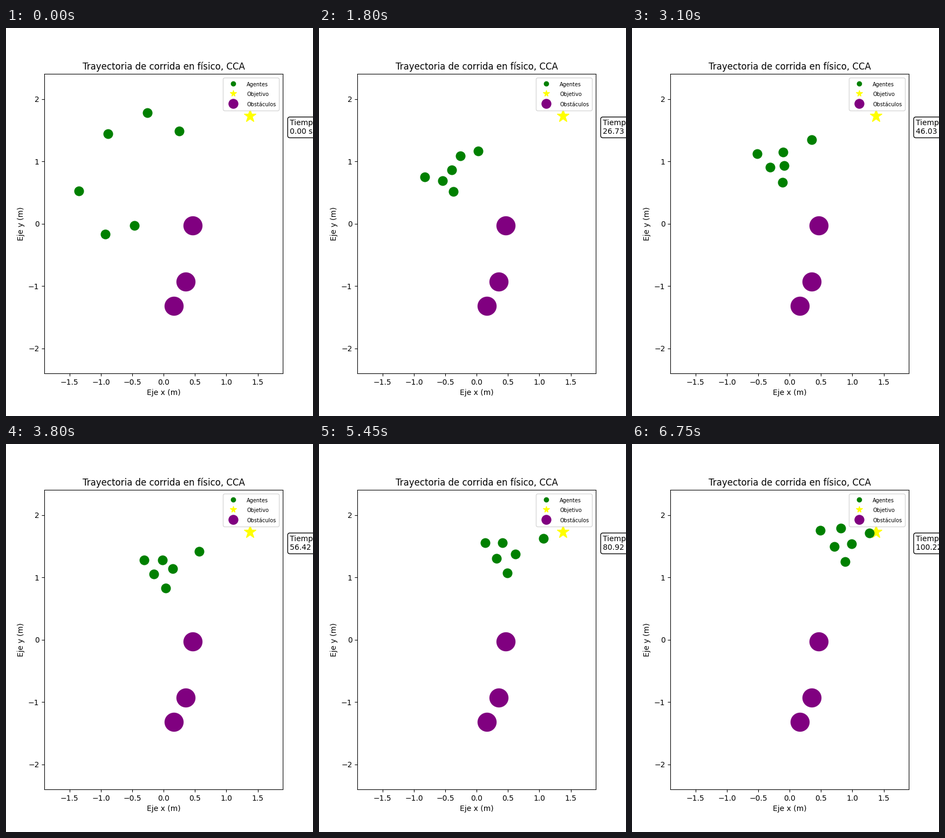
A matplotlib script that plays this animation: 569 by 719 pixels, repeating every 6800 ms.

```python
import numpy as np
import matplotlib.pyplot as plt
from matplotlib.animation import FuncAnimation

FRAMES, STEP = 136, 50
SECONDS_PER_FRAME = 0.7424
WIDTH, HEIGHT = 569, 719

# Gather, regroup, turn, then drift to the goal; the leader comes last
KEYS = np.array([0, 22, 49, 76, 135])
ROUTES = [
    [(135, 302), (180, 295), (211, 252), (256, 215), (349, 160)],
    [(189, 196), (231, 244), (260, 271), (309, 231), (407, 185)],
    [(262, 157), (255, 235), (273, 237), (290, 215), (387, 156)],
    [(238, 366), (239, 307), (265, 300), (296, 267), (395, 218)],
    [(184, 382), (215, 294), (241, 274), (274, 241), (375, 190)],
    [(321, 191), (285, 238), (312, 215), (358, 199), (440, 165)],
]
OBSTACLES = [(346, 366), (333, 470), (311, 515)]
GOAL = [(452, 163)]


def metres(points):
    """Canvas pixels to axis units."""
    return (np.array(points) - (292.1, 362.6)) / (116.25, -115.5)


points = metres(ROUTES)
gaps = np.diff(KEYS)
speed = np.diff(points, axis=1) / gaps[:, None]

# Harmonic mean slopes keep every leg free of overshoot
before, after = speed[:, :-1], speed[:, 1:]
product = before * after
slopes = np.zeros_like(points)
slopes[:, 0], slopes[:, -1] = speed[:, 0], speed[:, -1]
np.divide(2 * product, before + after, out=slopes[:, 1:-1], where=product > 0)
slopes[-1, -1] = 0  # the leader brakes at the goal


def positions(frame):
    k = min(np.searchsorted(KEYS, frame, side="right"), len(gaps)) - 1
    s = (frame - KEYS[k]) / gaps[k]
    ease = s * s * (3 - 2 * s)
    bend = slopes[:, k] * (1 - s) - slopes[:, k + 1] * s
    return (points[:, k] * (1 - ease) + points[:, k + 1] * ease
            + gaps[k] * s * (1 - s) * bend)


fig = plt.figure(figsize=(WIDTH / 100, HEIGHT / 100), dpi=100)
ax = fig.add_axes([71.25 / WIDTH, 79.2 / HEIGHT, 441.75 / WIDTH, 554.4 / HEIGHT])
ax.set(xlim=(-1.9, 1.9), ylim=(-2.4, 2.4), xlabel="Eje x (m)",
       ylabel="Eje y (m)", title="Trayectoria de corrida en físico, CCA")

agents, = ax.plot([], [], "o", color="green", ms=12, label="Agentes", zorder=3)
ax.plot(*metres(GOAL).T, "*", color="yellow", ms=17, label="Objetivo")
ax.plot(*metres(OBSTACLES).T, "o", color="purple", ms=24.5, label="Obstáculos")
legend = ax.legend(loc="upper right", markerscale=0.5)
plt.setp(legend.get_texts(), fontsize=7)
clock = ax.text(1.03, 0.8, "", transform=ax.transAxes,
                bbox=dict(boxstyle="round", facecolor="white"))


def update(frame):
    agents.set_data(*positions(frame).T)
    clock.set_text(f"Tiempo:\n{frame * SECONDS_PER_FRAME:.2f} s")
    return agents, clock


anim = FuncAnimation(fig, update, frames=FRAMES, interval=STEP,
                     repeat=True, repeat_delay=0)
plt.show()
```
